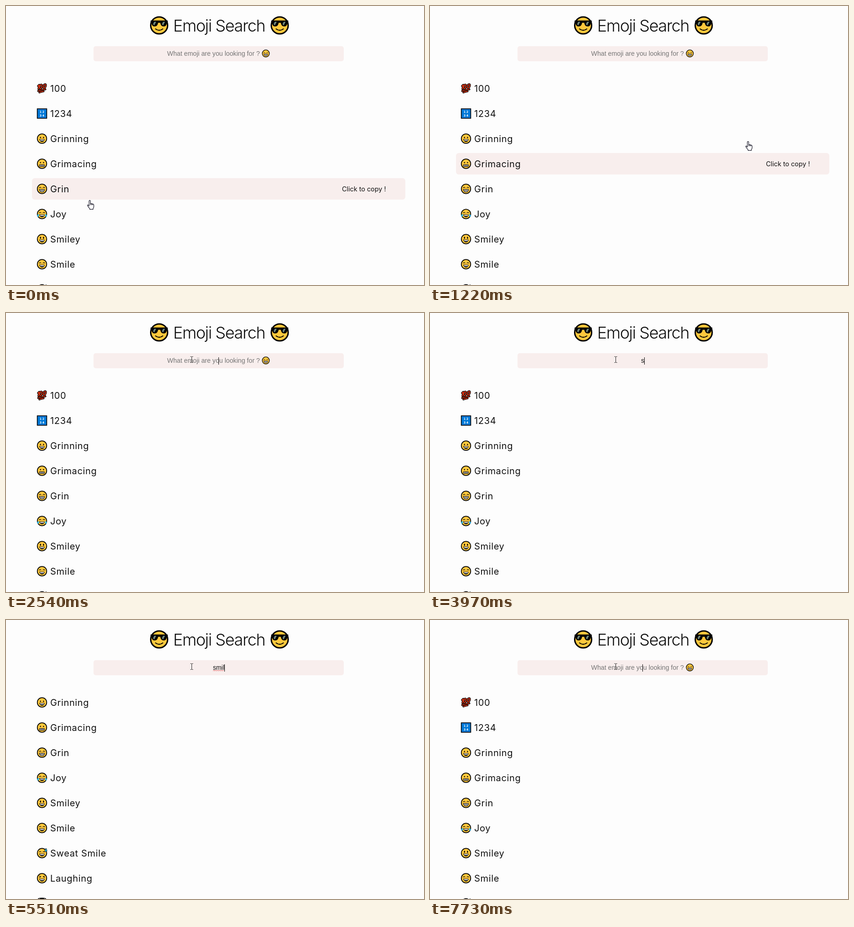
Animation of 917 by 611 pixels, one loop 8 s. Source, as an HTML page:

```html
<!DOCTYPE html>
<html lang="en">
<head>
<meta charset="utf-8">
<title>Emoji Search</title>
<style>
  html, body { margin: 0; width: 100%; height: 100%; overflow: hidden; background: #fdfdfd; }
  svg { display: block; }
  text { font-family: Inter, "Open Sans", sans-serif; fill: #111; white-space: pre; }
  .title { font-size: 36px; font-weight: 300; letter-spacing: -1.4px; text-anchor: middle; }
  .label { font-size: 20px; font-weight: 400; letter-spacing: .65px; }
  .copy { font-size: 14.4px; font-weight: 400; }
  .field { font: 14.2px "Liberation Sans", Arial, sans-serif; }
  .panel { fill: #f8eeed; }
  .line { fill: none; stroke: #000; stroke-linecap: round; stroke-linejoin: round; }
  .key { font: 700 6.2px "DejaVu Sans", sans-serif; fill: #fff; text-anchor: middle; }
</style>
</head>
<body>
<svg width="917" height="611" viewBox="0 0 917 611">
  <defs id="defs"></defs>
  <use href="#cool" transform="translate(336 42.5) scale(1.8)"/>
  <text class="title" x="467.5" y="55.5">Emoji Search</text>
  <use href="#cool" transform="translate(600.5 42.5) scale(1.8)"/>

  <rect class="panel" x="192" y="88" width="549" height="33" rx="5"/>
  <g id="hint">
    <text class="field" x="353.5" y="109" style="fill:#757575">What emoji are you looking for ?</text>
    <use href="#grin" transform="translate(570 104) scale(.76)"/>
  </g>
  <text id="typed" class="field" x="466.5" y="109" text-anchor="middle"></text>
  <path id="squiggle" fill="none" stroke="#d44" stroke-width=".8"/>
  <rect id="caret" y="97" width="1" height="16"/>

  <g id="hover">
    <rect class="panel" x="57" y="157" width="819" height="47" rx="6"/>
    <text class="copy" x="737" y="186">Click to copy !</text>
  </g>
  <g id="list"></g>

  <g id="hand" stroke="#1b1b2b" stroke-width="1.2" stroke-linejoin="round" fill="#fff">
    <path d="M4.2 13V2.4Q4.3 .7 5.7 .7T7.2 2.4V7.6Q8.6 6.9 9.6 8.1Q11 7.4 12 8.7Q14.6 8.3 14.6 11V14.6Q14.4 17 13 18.4V20.4H5.8V18.8Q4 17 .9 12.3Q.3 10.8 1.7 10.6Q2.8 10.7 4.2 13Z"/>
    <path d="M7.2 7.6V11M9.6 8.1V11M12 8.7V11.2" fill="none"/>
  </g>
  <path id="arrow" d="M.5 .5V14.2L3.6 11.3L5.8 16.3L8 15.4L5.9 10.5H9.9Z" fill="#fff" stroke="#111"/>
  <path id="beam" d="M.5 .5H2.7L3.5 1.3L4.3 .5H6.5M3.5 1V13M.5 13.5H2.7L3.5 12.7L4.3 13.5H6.5" fill="none" stroke="#222"/>
</svg>

<script>
const LOOP = 8000, ROW = 55, TOP = 180.5;
const $ = id => document.getElementById(id);
const line = (d, width = 1.4, color = '#000') => `<path class="line" style="stroke:${color}" stroke-width="${width}" d="${d}"/>`;
const fill = (d, color) => `<path d="${d}" fill="${color}"/>`;

const disc = '<circle r="10.3" fill="#ffc83d" stroke="#000" stroke-width="1.7"/>';
const dots = (ry, y) => [-3.3, 3.3].map(x => `<ellipse cx="${x}" cy="${y}" rx="1.25" ry="${ry}"/>`).join('');
const arcs = line('M-6.4 -2.2Q-4.2 -5 -2 -2.2M2 -2.2Q4.2 -5 6.4 -2.2', 1.1);
const mouth = 'M-5.2 1.6H5.2Q4.6 6.6 0 6.6T-5.2 1.6Z';
const laugh = fill(mouth, '#fff') + fill('M-4.6 4H4.6Q3.4 6.6 0 6.6T-4.6 4Z', '#222') + line(mouth, 1);
const teeth = fill('M-5.9 1.2H5.9Q5.4 7 0 7T-5.9 1.2Z', '#fff') +
  line('M-5.9 1.2H5.9Q5.4 7 0 7T-5.9 1.2Z', 1) + line('M-5.2 3.9H5.2M-2.8 1.4V6.4M0 1.4V6.8M2.8 1.4V6.4', .7);
const bars = fill('M-5.3 2H5.3V6.2H-5.3Z', '#fff') +
  line('M-5.3 2H5.3V6.2H-5.3Z', 1) + line('M-5.3 4.1H5.3M-2.7 2V6.2M0 2V6.2M2.7 2V6.2', .7);
const shades = fill('M-10.4 -6H10.4V-4L9.4 -3.4Q9 1.3 5.4 1.3Q2 1.3 1.3 -3.2H-1.3Q-2 1.3 -5.4 1.3Q-9 1.3 -9.4 -3.4L-10.4 -4Z', '#000') +
  fill('M-6 -4.4H-3.6L-6 .1L-7.5 -1.5ZM4.8 -4.4H7.2L4.8 .1L3.3 -1.5Z', '#70877d');

const hundred = 'M-8.7 -5.2L-6.2 -7.8L-7.8 1.6M-1.9 -8.2Q-5 -7.6 -4.9 -2.2Q-4.4 1.7 -2 -.2Q.4 -3 .2 -6.2Q-.2 -8.5 -1.9 -8.2Z' +
  'M6.3 -9Q3.2 -8.4 3 -3.2Q3.4 .6 6 -1.3Q8.6 -4 8.5 -7.2Q8 -9.3 6.3 -9ZM-8.4 5.7Q-1 2.4 7.4 2M-5.6 8.7Q-2 6.9 3.4 6.2';
const symbols = {
  hundred: line(hundred, 4.2) + line(hundred, 1.7, '#f03a17'),
  numbers: '<rect x="-10.4" y="-10.4" width="20.8" height="20.8" fill="#0078d7" stroke="#000" stroke-width="1.6"/>' +
    [[1, -3, -1.2], [2, 3, -1.2], [3, -3, 6.6], [4, 3, 6.6]].map(([n, x, y]) => `<text class="key" style="fill:#fff" x="${x}" y="${y}">${n}</text>`).join(''),
  grinning: disc + dots(1.5, -2.4) + laugh,
  grimacing: disc + dots(1.4, -2.4) + bars,
  grin: disc + arcs + teeth,
  joy: disc + arcs + laugh + fill('M-6.4 .2Q-11.2 .6 -10.6 4.6Q-9.2 7.4 -7 4.8ZM6.4 .2Q11.2 .6 10.6 4.6Q9.2 7.4 7 4.8Z', '#27b4e8'),
  smiley: disc + dots(2.4, -2.8) + laugh,
  smile: disc + arcs + laugh,
  sweat: disc + arcs + laugh + '<path d="M8.8 -10.6Q5.4 -6 6.4 -4.2Q8.6 -1.8 10.8 -4.2Q11.4 -6.4 8.8 -10.6Z" fill="#27b4e8" stroke="#000" stroke-width=".9"/>',
  laughing: disc + line('M-6 -5L-2.4 -3.2L-6 -1.4M6 -5L2.4 -3.2L6 -1.4', 1.1) + laugh,
  innocent: disc + '<ellipse cy="-9.6" rx="8.5" ry="2" fill="none" stroke="#000" stroke-width="1.5"/>',
  cool: disc + shades + line('M-4.4 4.3Q0 7.6 4.4 4.3', 1.2)
};
$('defs').innerHTML = Object.entries(symbols).map(([id, art]) => `<g id="${id}">${art}</g>`).join('');

const rows = [['hundred', '100'], ['numbers', '1234'], ['grinning', 'Grinning'], ['grimacing', 'Grimacing'],
  ['grin', 'Grin'], ['joy', 'Joy'], ['smiley', 'Smiley'], ['smile', 'Smile'],
  ['sweat', 'Sweat Smile'], ['laughing', 'Laughing'], ['innocent', 'Innocent']];
$('list').innerHTML = rows.map(([id, name], i) =>
  `<g transform="translate(0 ${TOP + i * ROW})"><use href="#${id}" x="79"/><text class="label" x="97" y="7.5">${name}</text></g>`).join('');

// time, pointer shape, x, y, hovered row
const pointer = [
  [0, 'hand', 178, 425, 4], [140, 'hand', 200, 471, 5], [290, 'hand', 250, 522, 6], [410, 'hand', 320, 560, 7],
  [530, 'hand', 420, 586, 7], [680, 'hand', 568, 592, 8], [800, 'arrow', 654, 589, 8], [950, 'hand', 690, 520, 6],
  [1070, 'hand', 695, 412, 5], [1220, 'hand', 692, 296, 3], [1370, 'hand', 688, 218, 1], [1490, 'hand', 684, 176, 0],
  [1610, 'hand', 670, 154, 0], [1760, 'arrow', 640, 152], [1880, 'arrow', 602, 150], [2000, 'arrow', 557, 148],
  [2120, 'arrow', 424, 148], [2270, 'arrow', 410, 122], [2390, 'beam', 404, 95]
];
// time, typed text, caret x (0 = hidden), spelling mark
const typing = [
  [0, '', 0], [2540, '', 466], [3100, '', 0], [3540, '', 466], [3970, 's', 470], [4090, 'sm', 476],
  [4240, 'smi', 477], [4490, 'smil', 479], [4950, 'smil', 0], [5510, 'smil', 479, 1], [5970, 'smil', 0, 1],
  [6530, 'smil', 479, 1], [6780, 'smi', 477], [7060, 'sm', 0], [7460, 's', 0], [7730, '', 466]
];

let wave = 'M454 111.5';
for (let x = 456; x <= 479; x += 2) wave += `L${x} ${x % 4 ? 111.5 : 110}`;
$('squiggle').setAttribute('d', wave);

const show = (el, on) => { el.style.display = on ? '' : 'none'; };
const at = (track, t) => track.findLast(step => step[0] <= t);

function draw(now) {
  const t = now % LOOP;
  const [, shape, x, y, row] = at(pointer, t);
  for (const id of ['hand', 'arrow', 'beam']) show($(id), id === shape);
  $(shape).setAttribute('transform', `translate(${x} ${y})`);
  show($('hover'), row !== undefined);
  $('hover').setAttribute('transform', `translate(0 ${(row || 0) * ROW})`);

  const [, word, caret, marked] = at(typing, t);
  const filtered = word.length > 1;
  if ($('typed').textContent !== word) $('typed').textContent = word;
  show($('hint'), !word);
  show($('caret'), caret);
  $('caret').setAttribute('x', caret);
  show($('squiggle'), marked);
  $('list').setAttribute('transform', `translate(0 ${filtered ? -2 * ROW : 0})`);
  [...$('list').children].forEach((el, i) => show(el, !filtered || i > 1));
}

const start = performance.now();
function tick() {
  draw(performance.now() - start);
  requestAnimationFrame(tick);
}
tick();
</script>
</body>
</html>
```
